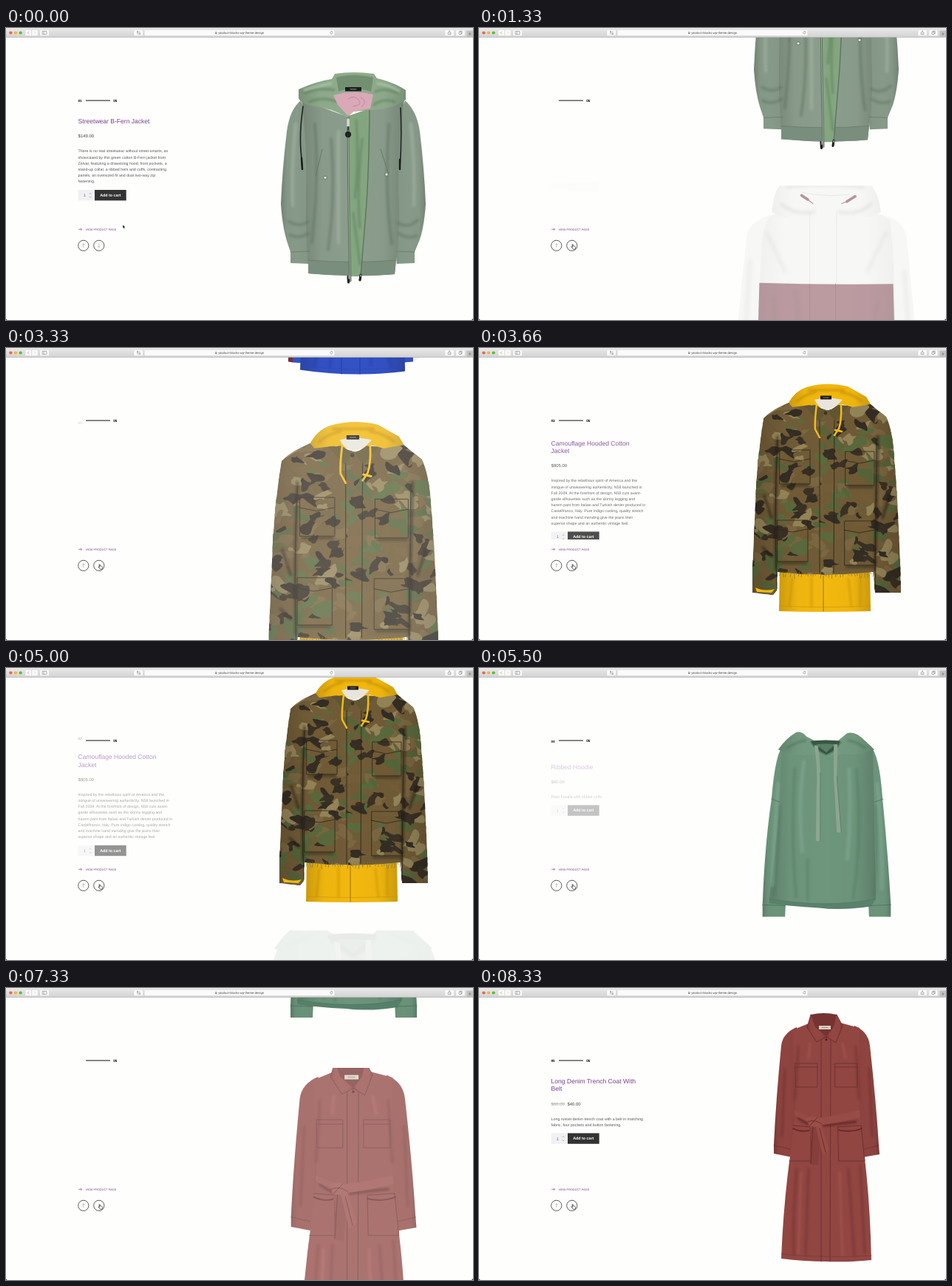
Animation of 632x395 px, one loop 8.66 s. Source, as an HTML page:

```html
<!DOCTYPE html>
<html lang="en">
<head>
<meta charset="utf-8">
<title>Product slider</title>
<style>
  html, body { margin: 0; width: 100%; height: 100%; overflow: hidden; background: #fefefd; }
  svg { display: block; width: 100vw; height: 100vh; }
  text { font-family: "Liberation Sans", Arial, sans-serif; text-rendering: geometricPrecision; }
  .title { font-size: 8.56px; fill: #7a3d90; }
  .price { font-size: 5.98px; fill: #444; }
  .copy { font-size: 5.27px; fill: #585858; }
  .bold { font-weight: 700; }
</style>
</head>
<body>
<svg viewBox="0 0 632 395">
  <defs>
    <clipPath id="view"><rect y="13" width="632" height="382"/></clipPath>
    <clipPath id="copyBox"><rect x="90" y="60" width="200" height="199"/></clipPath>
    <linearGradient id="shade">
      <stop offset="0" stop-opacity=".16"/><stop offset=".2" stop-opacity=".02"/>
      <stop offset=".5" stop-opacity="0"/><stop offset=".8" stop-opacity=".02"/>
      <stop offset="1" stop-opacity=".16"/>
    </linearGradient>
    <linearGradient id="paleShade">
      <stop offset="0" stop-opacity=".07"/><stop offset=".2" stop-opacity="0"/>
      <stop offset=".8" stop-opacity="0"/><stop offset="1" stop-opacity=".07"/>
    </linearGradient>
    <linearGradient id="bar" x2="0" y2="1">
      <stop stop-color="#e9e9e9"/><stop offset="1" stop-color="#d2d2d2"/>
    </linearGradient>
    <filter id="soft" filterUnits="userSpaceOnUse" x="340" y="10" width="270" height="385">
      <feGaussianBlur stdDeviation="1.5"/>
    </filter>
  </defs>
  <rect width="632" height="395" fill="#fefefd"/>
  <g id="slides"></g>

  <g id="numbers" class="bold" font-size="4.7"></g>
  <path d="M108 98.1H141" stroke="#111"/>
  <text x="145.2" y="99.7" class="bold" font-size="4.7">05</text>
  <g id="copies" clip-path="url(#copyBox)"></g>

  <path d="M98 272.3h4.6m-1.8-1.8 1.8 1.8-1.8 1.8" fill="none" stroke="#7a3d90" stroke-width=".6"/>
  <text x="107.6" y="273.8" font-size="3.88" fill="#7a3d90">VIEW PRODUCT PAGE</text>
  <g fill="none" stroke="#333" stroke-width=".8">
    <circle cx="104.8" cy="294.3" r="7.1"/><circle cx="125.8" cy="294.3" r="7.1"/>
    <path d="M104.8 297v-5.2m-1.6 1.6 1.6-1.6 1.6 1.6M125.8 291.6v5.2m-1.6-1.6 1.6 1.6 1.6-1.6" stroke="#888" stroke-width=".5"/>
  </g>

  <g id="browser">
    <rect width="632" height="12.6" fill="url(#bar)"/>
    <rect y="12.2" width="632" height=".7" fill="#b4b4b4"/>
    <circle cx="6.4" cy="6.5" r="2.1" fill="#ee5f57"/>
    <circle cx="13" cy="6.5" r="2.1" fill="#eeb433"/>
    <circle cx="19.7" cy="6.5" r="2.1" fill="#57bb3c"/>
    <g fill="#fafafa" stroke="#c9c9c9" stroke-width=".3">
      <rect x="26" y="2.4" width="17.2" height="8.1" rx="1.3"/>
      <rect x="46" y="2.4" width="12.4" height="8.1" rx="1.3"/>
      <rect x="173" y="2.4" width="12.4" height="8.1" rx="1.3"/>
      <rect x="187.3" y="2.4" width="257.5" height="8.1" rx="1.3"/>
      <rect x="594" y="2.4" width="12.2" height="8.1" rx="1.3"/>
      <rect x="608.8" y="2.4" width="12.2" height="8.1" rx="1.3"/>
    </g>
    <rect x="623.5" y="3.5" width="8.5" height="9" fill="#c2c2c2"/>
    <g fill="none" stroke="#666" stroke-width=".5">
      <path d="M31 4.7 29.3 6.5 31 8.3"/>
      <path d="M38.2 4.7 39.9 6.5 38.2 8.3M34.7 2.6v7.8" stroke="#bbb"/>
      <path d="M49.2 4.4h5.8v4.2h-5.8zM51.2 4.4v4.2"/>
      <path d="M177.4 4.6h1.5v1.5h-1.5zM180 7.1h1.5v1.5H180zM180 5.4h1.6M177.2 7.9h1.6"/>
      <path d="M283.6 6.4v-.7a.7.7 0 0 1 1.4 0v.7M441.6 5.3a1.6 1.6 0 1 0 .3 1.5M441.8 4.4v1.2h-1.2"/>
      <path d="M599 6h-.8v2.7h3.8V6h-.8M600.1 7.4V3.8m-1 1 1-1 1 1"/>
      <path d="M613 5.2h3v3.3h-3zM614.2 5.2v-1h3v3.3h-1.2M627.8 6v4M625.8 8h4"/>
    </g>
    <rect x="283.3" y="6.3" width="2" height="1.8" fill="#777"/>
    <text x="287.4" y="8.2" font-size="4.3" fill="#444">product-blocks.wp-theme.design</text>
  </g>
  <path d="M0 393v2h2Q.3 394.7 0 393M632 392.5v2.5h-2.5Q631.7 394.7 632 392.5" fill="#333"/>

  <g id="cursor" stroke="#fff" stroke-width=".5">
    <path id="arrow" d="M0 0v5.2l1.2-1.1.8 1.9.9-.4-.8-1.8h1.7z" fill="#111"/>
    <path id="hand" d="M-.2-.8q.7-.5 1 .3v1.6l2.3.5q.9.3.8 1.4L3.5 5.4H.4L-1.2 3q-.4-1 .6-.6l.4.4z" fill="#fff" stroke="#111" stroke-width=".6"/>
  </g>
</svg>
<script>
const $ = id => document.getElementById(id);

// Drawing helpers
const shape = (d, fill) => `<path d="${d}" fill="${fill}"/>`;
const cloth = (d, fill, shade = 'shade') => shape(d, fill) + shape(d, `url(#${shade})`);
const seam = (d, color, width = .6) =>
  `<path d="${d}" fill="none" stroke="${color}" stroke-width="${width}" stroke-linecap="round" stroke-linejoin="round"/>`;
const folds = (d, color, width = 4, opacity = .35) =>
  `<g filter="url(#soft)" opacity="${opacity}">${seam(d, color, width)}</g>`;

function seeded(seed) {
  return () => (seed = (seed * 16807) % 2147483647) / 2147483647;
}

function blob(rnd, x, y, size, fill) {
  const count = 10, angle = rnd() * 2 - 1;
  const points = Array.from({ length: count }, (_, i) => {
    const a = i / count * 2 * Math.PI, r = size * (.25 + rnd() * 1.1);
    const px = Math.cos(a) * r * 1.4, py = Math.sin(a) * r * .8;
    return [x + px * Math.cos(angle) - py * Math.sin(angle), y + px * Math.sin(angle) + py * Math.cos(angle)];
  });
  const mid = i => {
    const p = points[i % count], q = points[(i + 1) % count];
    return [(p[0] + q[0]) / 2, (p[1] + q[1]) / 2].map(v => v.toFixed(1)).join(' ');
  };
  const curve = points.map((_, i) =>
    `Q${points[(i + 1) % count].map(v => v.toFixed(1)).join(' ')} ${mid(i + 1)}`).join('');
  return shape(`M${mid(0)}${curve}Z`, fill);
}

function greenJacket() {
  return cloth('M399 98Q384 110 380 140Q374 190 372 238Q374 268 380 288L385 303V318L411 319 412 300Q416 250 414 200L410 130Z', '#879a89')
    + cloth('M540 98Q556 112 560 140Q566 190 568 238Q566 268 560 286L553 303V318L529 319 527 300Q522 250 524 200L528 130Z', '#879a89')
    + cloth('M400 97Q408 160 406 220Q405 280 409 314V332Q468 338 526 333L528 314Q534 270 531 220Q530 150 539 97L500 108 462 120Z', '#8b9d8c')
    + folds('M383 262Q398 270 408 262M384 280Q396 286 409 278M557 260Q543 272 531 264M556 281Q544 286 532 278M418 130Q424 200 414 290M518 130Q512 220 522 292M440 150Q446 230 436 300', '#4f6652')
    + folds('M392 130Q386 190 388 240M548 130Q554 190 552 240M450 140V290', '#b3c2b1', 5)
    + shape('M409 314Q468 319 528 314L526 333Q468 338 409 332Z', '#7a8e7d')
    + seam('M409 314Q468 319 528 314M385 303 411 302M553 303 528 302', '#5f7362')
    + shape('M463 119 492 109Q491 190 487 250L480 336H466Z', '#84a67f')
    + folds('M474 125Q478 180 472 230M482 150Q474 220 479 270M470 250 479 320', '#55785a', 3, .5)
    + seam('M463 120Q463 230 466 342', '#596b5c', 3) + seam('M463 120Q463 230 466 342', '#a9b4a8', 1)
    + seam('M492 110Q491 200 487 250L480 336', '#5d7560', 1.4)
    + cloth('M396 83Q420 72 441 69L445 62Q470 58 498 62L502 68Q524 73 541 84V97Q524 110 493 111L470 113 462 121Q440 108 412 105Q398 101 396 95Z', '#8fac8c')
    + folds('M404 88Q425 80 444 84M410 100Q430 92 448 100M530 88Q512 80 500 86M526 100Q510 94 498 104', '#55755a', 3, .55)
    + folds('M404 84Q424 78 440 75M532 85Q518 77 503 75', '#c0d3ba', 3, .6)
    + shape('M447 67Q470 60 497 67L494 86Q470 78 450 86Z', '#738f72')
    + shape('M443 91Q470 83 497 90L493 109 470 113 463 119 449 104Z', '#d9a9b8')
    + seam('M463 96Q470 90 477 97T470 106M480 94Q490 98 482 106', '#b9708c')
    + '<rect x="459" y="80" width="22" height="5.5" rx=".5" fill="#191b1b"/>' + seam('M466 82.8H474', '#ccc', .7)
    + seam('M402 106Q397 140 399 165L401 190M534 108Q536 150 533 190', '#222824', 1.7)
    + seam('M400 176 401 191M533 178V191', '#151917', 2.4)
    + seam('M428 164 419 200M507 164 518 198', '#66796a', 1)
    + '<g fill="#e6e8e4" stroke="#4f5d51" stroke-width=".8"><circle cx="432" cy="202.5" r="2.2"/><circle cx="515" cy="198" r="2.2"/></g>'
    + seam('M463 124V132', '#d8d8d8', 3.6) + seam('M463 134V138', '#303531', 1.8)
    + '<circle cx="463" cy="144" r="4.2" fill="#20231f"/>'
    + seam('M463 336 463.5 344M480 334 479 341', '#1c1f1c', 3.2) + seam('M464 335V339M480 334V336', '#d2d5d0', 1.2);
}

function whiteJacket() {
  const white = '#f0f0ee', red = '#732d3b', blue = '#3352c4';
  return cloth('M422 94Q398 98 393 113Q384 190 379 270Q376 296 378 318L386 321 402 318 406 200Z', white, 'paleShade')
    + cloth('M520 94Q544 98 548 116Q556 200 563 270Q566 300 562 320L554 325 538 318 534 200Z', white, 'paleShade')
    + shape('M382 321 388 320V328L382 327Z', red) + shape('M388 320 402 318V329L388 328Z', blue)
    + shape('M538 319 551 319.5V327L539 328Z', blue)
    + shape('M396 318 404 300V320Z', red)
    + cloth('M420 94Q408 98 407 130L401 270 402 318H538V250Q536 130 532 100L520 94Z', white, 'paleShade')
    + cloth('M405 161Q470 163 535 162L537 237Q470 235 403 235Z', red)
    + cloth('M443 236H498L518 262 539 268 540 340Q470 349 398 338L401 268 416 261Z', blue)
    + folds('M418 175Q424 205 414 230M520 180Q512 210 522 232M440 170Q446 210 438 232', '#421521', 3)
    + folds('M418 275Q428 310 416 333M520 280Q510 310 522 333M440 260Q446 300 438 335M490 270 494 332', '#1c3187', 3, .3)
    + folds('M396 140Q390 220 388 305M546 150Q552 230 552 305M412 112 430 150M528 112 510 150M408 245 414 254M531 244 524 254', '#b9b9b7', 4)
    + cloth('M417 92Q419 72 426 64Q468 57 511 63Q521 73 523 92Q508 101 480 98L468 95 454 98Q430 101 417 92Z', white, 'paleShade')
    + folds('M426 84Q440 96 458 92M514 84Q502 96 482 92M432 68Q468 63 506 68', '#aaaaa8', 2.5, .55)
    + seam('M447 73Q468 78 492 75', '#d3d3d1', .8)
    + seam('M446 76 452 80M498 77 490 82', '#671f31', 2.6) + seam('M452 80 457 84M490 82 485 84', '#671f31', .8)
    + seam('M454 92V161M480 92V162', '#d2d2d0') + seam('M454 162V235M479 162V236', '#4a1422') + seam('M454 236V344M479 236V344', '#1e378f')
    + seam('M443 236 416 261M498 237 518 262', '#dadada', 1.3)
    + seam('M416 261 418 255M518 262 516 256', '#eee', 1.8) + seam('M400 332Q470 342 539 334', '#2a48b0');
}

function camoJacket() {
  const rnd = seeded(77), yellow = '#f2b80f', ink = '#2a261b';
  const colors = ['#5a6a3c', '#342d23', '#948458', '#735d38', '#566539', '#3a3125', '#7b6640'];
  const outline = 'M426 71Q398 82 385 95Q376 150 374 210L370 300 370 331 398 334 403 328 404 303Q470 310 534 303L536 331 571 331 570 290Q566 190 562 150Q560 110 551 93L526 73 472 84Z';
  const blobs = Array.from({ length: 290 }, (_, i) =>
    blob(rnd, 366 + rnd() * 208, 70 + rnd() * 268, 5 + rnd() * 8, colors[i % colors.length])).join('');
  const fray = Array.from({ length: 36 }, (_, i) => `M${404 + i * 3.7} 303l${(rnd() * 3 - 1.5).toFixed(1)} ${(2 + rnd() * 7).toFixed(1)}`).join('');
  const pocket = (x, y, w, h) => seam(`M${x} ${y}h${w}v${h}h${-w}zM${x - 1} ${y + 12}l${w / 2} 4 ${w / 2 + 1}-4`, ink, .8)
    + folds(`M${x + 2} ${y + h + 2}h${w - 4}`, '#151209', 2.5, .5);
  return cloth('M407 298H529L530 356Q468 358 406 356Z', yellow)
    + folds('M424 312 420 350M450 310V350M500 312 504 350M516 312V348', '#b07b00', 3)
    + seam('M407 349Q468 352 530 349', '#c99108') + seam('M466 308V356', '#a97b13', 1.2)
    + `<clipPath id="camo"><path d="${outline}"/></clipPath><g clip-path="url(#camo)">${shape(outline, '#705b36')}${blobs}</g>`
    + shape(outline, 'url(#shade)')
    + folds('M404 120Q400 200 402 300M540 120Q538 200 536 300M386 200 396 230M556 200 546 230M384 270 396 282', '#14110a', 3, .55)
    + seam('M461 88V304M481 92 480 304', ink, .9) + seam('M404 125Q399 220 403 326M538 125 536 326', ink, .9)
    + pocket(407, 138, 41, 46) + pocket(496, 140, 39, 46) + pocket(404, 233, 41, 56) + pocket(495, 234, 41, 60)
    + seam(fray, '#7c704c', .7)
    + shape('M374 324Q386 330 400 326L396 331 376 330Z', yellow)
    + cloth('M419 74Q428 58 443 53Q470 45 499 52L524 66 530 76 506 80 491 76 472 82 450 77 424 80Z', yellow)
    + folds('M430 72Q442 62 455 60M518 72Q506 62 490 60M446 57H494', '#b47c00', 3, .5)
    + shape('M454 70Q470 65 492 70L484 78 470 84 458 77Z', '#e9e5dc')
    + '<rect x="462" y="64.5" width="15" height="5" fill="#1d1a17"/>' + seam('M466 67H473', '#ccc', .6)
    + shape('M440 78 456 77 470 86 460 99ZM500 78 486 77 472 86 482 99Z', '#625631')
    + seam('M457 76Q454 100 455 110L461 121M490 76Q491 98 487 109L481 118', '#f5bd16', 2.4)
    + seam('M482 111 491 113', '#f5bd16', 2.6)
    + '<circle cx="469" cy="88" r="2.4" fill="#3a3526"/>';
}

function hoodie() {
  const green = '#6a9279', dark = '#446a54';
  return cloth('M414 97Q402 106 397 170Q388 230 385 311V327H415L416 305 422 180Z', green)
    + cloth('M528 98Q541 110 545 170Q552 240 556 311V327H527L526 305 520 180Z', green)
    + cloth('M411 100Q408 150 407 190L394 306Q430 311 470 313T528 312L536 304Q534 200 532 104L470 92Z', '#6c947b')
    + shape('M394 303Q470 316 536 303L530 313Q490 319 460 315 420 313 394 309Z', '#56806a')
    + folds('M408 180Q406 240 400 298M536 180Q538 240 534 298M428 130Q422 220 430 300M510 130Q518 220 506 302M445 250V304', dark, 4, .3)
    + folds('M406 150Q400 226 398 285M538 150Q545 230 544 290M440 120Q432 180 438 240M500 130Q504 190 498 250', '#8fb5a0', 5)
    + seam('M408 174 397 170M534 174 546 170M385 311 415 312M556 311 527 312', dark, .7)
    + seam('M394 303Q470 316 536 303', '#4d765f', .7)
    + cloth('M406 104Q416 89 430 81Q437 79 444 87L454 92H486L498 82Q508 80 517 88L534 104Q514 113 494 110L470 113 452 111Q424 114 406 104Z', '#71997f')
    + folds('M418 102Q430 94 442 92M522 102Q510 94 500 92', dark, 3, .55)
    + shape('M449 93Q470 90 489 93Q484 105 470 111 456 105 449 93Z', '#35543f')
    + shape('M456 97Q470 96 482 97L470 108Z', '#557c65')
    + seam('M449 94Q458 108 470 112 482 108 490 94', '#4c745d', 1)
    + shape('M454 98 459 99Q463 130 462 160L462 226H456L457 160Q459 130 454 98Z', '#8ba58e')
    + shape('M480 97 485 97 484 140 490 215 484 214 480 140Z', '#8ba58e')
    + seam('M462 135V226M490 215 484 140', '#527762', .8);
}

function coat() {
  const russet = '#8e4440', dark = '#5e2827';
  return cloth('M430 53Q411 61 409 78Q402 150 399 212V224L424 229 432 160V100Z', russet)
    + cloth('M508 51Q527 59 529 78Q537 150 541 212L542 225 519 229 512 160V100Z', russet)
    + shape('M446 48 424 57Q427 110 428 170L422 220Q412 290 409 366Q440 370 471 370 505 371 531 368Q529 280 520 215L515 170Q514 110 515 54L489 47Z', '#914642')
    + folds('M430 245Q424 310 426 360M446 245 442 360M500 245 508 362M516 240 522 358M432 80 428 150M510 80 514 150M414 110 410 200M528 110 532 200', dark, 3.5, .35)
    + folds('M436 250 432 360M488 250 492 362M448 75 446 95M492 75 496 95', '#b86661', 3, .35)
    + seam('M463 70V370M476 70 475 370', dark, .7)
    + seam('M428 102H458V134H429ZM482 102H512V134H482ZM428 107H458M482 107H512', '#682f2d', .8)
    + seam('M425 186 449 188V234H420M486 188 517 186 522 234H487Z', '#682f2d', .9)
    + seam('M425 190Q436 196 449 192M486 192Q504 196 518 190', dark, 1.6)
    + seam('M399 213 421 218M541 213 521 218', dark)
    + folds('M432 176 445 184M466 186 510 181', '#3f1516', 3, .6)
    + shape('M427 165 452 176 451 184 427 172Z', '#954a45')
    + shape('M457 176Q490 172 515 165L516 175Q490 182 459 186Z', '#984c47')
    + shape('M446 184 457 186 462 209 459 240 447 238 450 210Z', '#873f3b')
    + shape('M455 184 463 184 474 219 465 226Z', '#984c47')
    + seam('M452 186 449 237M461 190 469 222', dark, .8)
    + shape('M443 176Q450 172 459 175L466 183 458 188 447 187Z', '#9a4e48') + seam('M445 181Q454 177 464 184M447 187 458 175', dark, .8)
    + shape('M449 36Q467 32 484 36L491 50 470 68 446 50Z', '#753332')
    + cloth('M449 36 444 53 457 73 470 66 455 53Z', '#934642') + cloth('M484 36 492 51 483 74 470 66 480 53Z', '#934642')
    + seam('M449 36 444 53 457 73 470 66 483 74 492 51 484 36', dark, .7)
    + '<rect x="460" y="51" width="16" height="5" fill="#d9cfc2"/>' + seam('M464 53.5H472', '#776', .7)
    + '<circle cx="470" cy="70" r="1.4" fill="#4a1a1b"/>' + seam('M409 360Q470 366 531 362', '#6f3230', .5);
}

const products = [
  { draw: greenJacket, title: ['Streetwear B-Fern Jacket'], price: '$149.00', copy: [
    'There is no real streetwear without street-smarts, as',
    'showcased by this green cotton B-Fern jacket from',
    'Zelvar, featuring a drawstring hood, front pockets, a',
    'stand-up collar, a ribbed hem and cuffs, contrasting',
    'panels, an oversized fit and dual two-way zip',
    'fastening.'] },
  { draw: whiteJacket, title: ['White Hooded Jacket With', 'Colour Blocking'], price: '$49.99', copy: [
    'White jacket with a burgundy and blue colour block',
    'design, a funnel collar with contrast drawstrings on the',
    'hood, pockets, a zip-up front and sleeve tabs.'] },
  { draw: camoJacket, title: ['Camouflage Hooded Cotton', 'Jacket'], price: '$805.00', copy: [
    'Inspired by the rebellious spirit of America and the',
    'intrigue of unweavering authenticity, N58 launched in',
    'Fall 2009. At the forefront of design, N58 cuts avant-',
    'garde silhouettes such as the skinny legging and',
    'harem pant from Italian and Turkish denim produced in',
    'Castelfranco, Italy. Pure indigo casting, quality stretch',
    'and machine hand mending give the jeans their',
    'superior shape and an authentic vintage feel.'] },
  { draw: hoodie, title: ['Ribbed Hoodie'], price: '$60.00', copy: ['Plain hoodie with ribbed cuffs.'] },
  { draw: coat, title: ['Long Denim Trench Coat With', 'Belt'], oldPrice: '$60.00', price: '$40.00', copy: [
    'Long russet denim trench coat with a belt in matching',
    'fabric, four pockets and button fastening.'] }
];

const line = (cls, x, y, s) => `<text class="${cls}" x="${x}" y="${y}">${s}</text>`;

function copyMarkup({ title, price, oldPrice, copy }) {
  const priceY = 138.2 + title.length * 10.2, copyY = priceY + 20, top = copyY + copy.length * 8.2 + 1.4;
  const old = oldPrice
    ? `<g opacity=".5">${line('price', 97.6, priceY, oldPrice)}${seam(`M97.6 ${priceY - 2}h18.4`, '#444', .5)}</g>` : '';
  return title.map((s, i) => line('title', 97.6, 129.2 + i * 10.2, s)).join('')
    + old + line('price', oldPrice ? 119.4 : 97.6, priceY, price)
    + copy.map((s, i) => line('copy', 97.6, copyY + i * 8.2, s)).join('')
    + `<rect x="97.7" y="${top}" width="22" height="14.4" fill="#f1f1f4"/>`
    + `<rect x="120" y="${top}" width="42.7" height="14.4" fill="#333"/>`
    + line('copy', 105, top + 9.1, '1')
    + seam(`M113 ${top + 5.2}l1.1-1.1 1.1 1.1M113 ${top + 9.4}l1.1 1.1 1.1-1.1`, '#777', .5)
    + `<text class="bold" x="127.2" y="${top + 8.9}" font-size="5.35" fill="#fff">Add to cart</text>`;
}

$('slides').innerHTML = products.map(p => `<g clip-path="url(#view)"><g>${p.draw()}</g></g>`).join('');
$('numbers').innerHTML = products.map((_, i) => `<text x="97.4" y="99.7">0${i + 1}</text>`).join('');
$('copies').innerHTML = products.map(p => `<g>${copyMarkup(p)}</g>`).join('');

// Motion
const LOOP = 8660, HEIGHT = 382, CENTER = [470, 203];
const clicks = [932, 2770, 4795, 6801];
const clamp = v => Math.min(1, Math.max(0, v));
const sine = v => (1 - Math.cos(Math.PI * clamp(v))) / 2;
const settle = v => (1 - clamp(v)) ** 2;

function place(node, y, opacity) {
  node.setAttribute('transform', `translate(0 ${y.toFixed(2)})`);
  node.setAttribute('opacity', opacity.toFixed(3));
  node.style.display = opacity > .001 ? '' : 'none';
}

function render(t) {
  // The copy reacts at once, the pictures follow a little later.
  const scroll = clicks.reduce((sum, c) => sum + sine((t - c - 55) / 715), 0);
  products.forEach((_, i) => {
    const since = i ? t - clicks[i - 1] : Infinity;
    const leaving = i < clicks.length ? t - clicks[i] : -Infinity;
    const offset = i - scroll, rest = clamp(offset);

    const slide = $('slides').children[i], [cx, cy] = CENTER;
    place(slide, offset * HEIGHT, offset > -1 ? 1 - rest : 0);
    slide.firstChild.setAttribute('transform',
      `translate(${cx} ${cy}) scale(${1 + .75 * rest}) translate(${-cx} ${-cy})`);

    const out = sine(leaving / 420);
    place($('copies').children[i], 11 * settle((since - 600) / 600) - 12 * out,
      clamp((since - 615) / 325) * (1 - out));

    const gone = sine(leaving / 300);
    place($('numbers').children[i], 4 * settle((since - 540) / 400) - 4 * gone,
      clamp((since - 540) / 180) * (1 - gone));
  });

  const move = sine((t - 80) / 800);
  const x = 158 - 31.3 * move, y = 266 + 27.8 * move;
  const over = Math.hypot(x - 125.8, y - 294.3) < 7.1;
  $('cursor').setAttribute('transform', `translate(${x} ${y})`);
  $('arrow').style.display = over ? 'none' : '';
  $('hand').style.display = over ? '' : 'none';
}

// The picture advances six times a second, on ten-millisecond marks.
let shown = -1;
const start = performance.now();
function tick() {
  const t = Math.max(0, performance.now() - start) % LOOP;
  const step = Math.floor((Math.floor(t / 10) * 10 + 9.9) * .006);
  if (step !== shown) render((shown = step) * 1000 / 6);
  requestAnimationFrame(tick);
}
tick();
</script>
</body>
</html>
```
